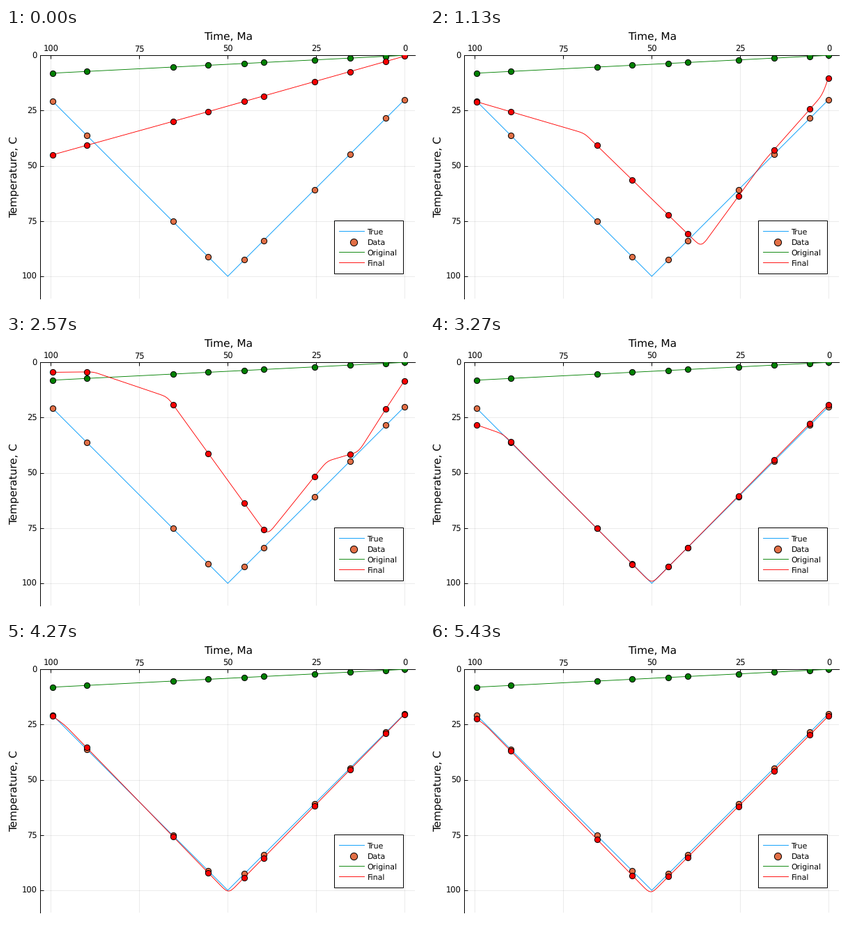
Animation, 600 px wide and 400 px high, one loop 5.46 s. Source, as a matplotlib script:

```python
import numpy as np
import matplotlib.pyplot as plt
from matplotlib.animation import FuncAnimation
from matplotlib.patches import Rectangle

W, H, DPI = 600, 400, 100
PX = 72 / DPI
STEPS, LOOP = 164, 5460
LEFT, RIGHT, TOP, BOTTOM = 49.2, 587.5, 39.2, 387.7

BLUE, ORANGE, GREEN, RED = "#009afa", "#e26f46", "#008000", "#ff0000"

plt.rcParams.update({"font.family": "DejaVu Sans", "text.hinting": "none"})

ages = np.array([99.5, 89.9, 65.5, 55.5, 45.3, 39.9, 25.5, 15.5, 5.3, 0.1])
START, END = ages[0], ages[-1]
grid = np.linspace(END, START, 498)
PAD = 16
kernel = np.exp(-0.5 * (np.arange(-PAD, PAD + 1) * (grid[1] - grid[0]) / 0.9) ** 2)
kernel /= kernel.sum()


def true_temp(t):
    return 100 - 1.6 * np.abs(t - 50)


def path(*knots):
    """Polyline sampled evenly on both sides of its deepest inner knot."""
    x, y = np.array(knots[::-1], float).T
    tip = x[1 + np.argmax(y[1:-1])]
    t = np.concatenate([np.linspace(END, tip, 200), np.linspace(tip, START, 200)[1:]])
    return np.array([t, np.interp(t, x, y)])


# Age and temperature at the bends of the fitted path, by step
poses = {
    0: path((START, 45), (50, 23), (END, 0.4)),
    33: path((START, 21), (69, 35.3), (36, 86.8), (18, 47.3), (1.5, 17.5), (END, 10.2)),
    48: path((START, 11.3), (82, 25.5), (47, 88.7), (22, 55.5), (END, 23.2)),
    77: path((START, 4.5), (88, 4.3), (67, 15.7), (38.8, 78.2), (22, 44.7),
             (13, 40.5), (5.3, 21), (END, 8.4)),
    98: path((START, 28.3), (92, 32.5), (50, 100.2), (END, 19.2)),
    128: path((START, 21.2), (96, 25.3), (49.8, 101.5), (END, 20.4)),
    163: path((START, 22.4), (97, 25.2), (50.3, 101.8), (1.5, 23.5), (END, 21.2)),
}
marks = list(poses)


def curve(i):
    """Morph between poses, overshooting ever less, then round the corners."""
    k = min(np.searchsorted(marks, i, side="right") - 1, len(marks) - 2)
    a, b = marks[k], marks[k + 1]
    u = (i - a) / (b - a)
    ease = u * u * (3 - 2 * u)
    t, temp = poses[a] * (1 - ease) + poses[b] * ease
    swing = (b - a) / 20 * np.exp(-i / 33) * np.sin(np.pi * u) ** 2
    y = np.interp(grid, t, temp * (1 + swing))
    y = np.pad(y, PAD, mode="reflect", reflect_type="odd")
    return np.convolve(y, kernel, mode="valid")


fig = plt.figure(figsize=(W / DPI, H / DPI), dpi=DPI, facecolor="white")
ax = fig.add_axes([LEFT / W, 1 - BOTTOM / H, (RIGHT - LEFT) / W, (BOTTOM - TOP) / H])
ticks = range(0, 101, 25)
ax.set(xlim=(103, -3), ylim=(110, 0), xticks=ticks, yticks=ticks)
ax.set_axisbelow(True)
ax.grid(color="black", alpha=0.08, lw=PX)
ax.tick_params(direction="in", length=5 * PX, width=PX, top=True, bottom=False,
               labelleft=False, labelbottom=False)
for side in ("right", "bottom"):
    ax.spines[side].set_visible(False)
for side in ("left", "top"):
    ax.spines[side].set_linewidth(PX)


def text(x, y, s, size=8.3, **kw):
    fig.text(x / W, 1 - y / H, s, fontsize=size, va="baseline", **kw)


for v in ticks:
    text(572.5 - 5.08 * v, 33.8, str(v), ha="center")
    text(44.3, 43.5 + 3.168 * v, str(v), ha="right")
text(319, 17.3, "Time, Ma", 11.1, ha="center")
text(15.5, 213.5, "Temperature, C", 11, ha="center", rotation=90, rotation_mode="anchor")


def line(color, x=(), y=(), z=3):
    return ax.plot(x, y, color=color, lw=0.9 * PX, zorder=z)[0]


def dots(color, x=(), y=(), z=3):
    return ax.plot(x, y, "o", ms=8.2 * PX, mfc=color, mec="black", mew=PX, zorder=z)[0]


bend = np.array([START, 50, END])
line(BLUE, bend, true_temp(bend))
dots(ORANGE, ages, true_temp(ages))
line(GREEN, ages, 0.081 * ages)
dots(GREEN, ages, 0.081 * ages)
fit = line(RED, z=4)
fit_dots = dots(RED, z=5)

# Legend, laid out in stage pixels
box = fig.add_axes([0, 0, 1, 1], zorder=2)
box.set(xlim=(0, W), ylim=(H, 0))
box.axis("off")
box.add_patch(Rectangle((471.2, 276.2), 99, 75.5, fc="white", ec="black", lw=PX))
rows = [("True", BLUE), ("Data", ORANGE), ("Original", GREEN), ("Final", RED)]
for n, (name, color) in enumerate(rows):
    y = 291.2 + 15.05 * n
    if name == "Data":
        box.plot([498.5], [y + 0.3], "o", ms=10.2 * PX, mfc=color, mec="black", mew=PX)
    else:
        box.plot([477.5, 513.5], [y, y], color=color, lw=0.9 * PX)
    box.text(518.5, y + 4.6, name, fontsize=7.9, va="baseline")


def update(i):
    y = curve(i)
    fit.set_data(grid, y)
    fit_dots.set_data(ages, np.interp(ages, grid, y))
    return fit, fit_dots


anim = FuncAnimation(fig, update, frames=STEPS, interval=LOOP / STEPS, repeat=True,
                     repeat_delay=0, init_func=lambda: update(0))
plt.show()
```
